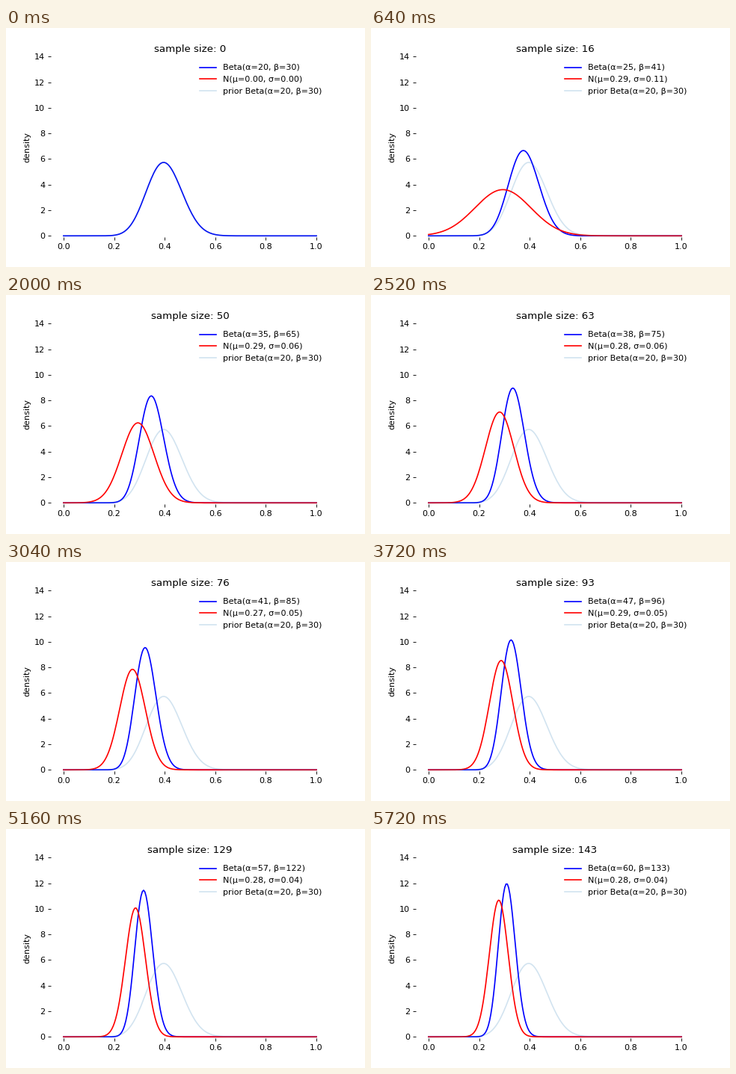
Recreate the animation shown at these times as a matplotlib script. Size 480x320 px, loop 5760 ms.

```python
from math import lgamma

import matplotlib.pyplot as plt
import numpy as np
from matplotlib.animation import FuncAnimation

FRAMES, STEP_MS = 144, 40
A0, B0 = 20, 30

plt.rcParams.update({"font.family": "DejaVu Sans", "font.size": 10})

x = np.linspace(0, 1, 200)

# Running count of successes, steady between a few known totals
trials = [0, 33, 50, 76, 109, 129, 143]
totals = [0, 11, 15, 21, 33, 37, 40]
hits = np.rint(np.interp(np.arange(FRAMES), trials, totals)).astype(int)


def beta_pdf(a, b):
    with np.errstate(divide="ignore"):
        log_pdf = (a - 1) * np.log(x) + (b - 1) * np.log1p(-x)
    return np.exp(log_pdf + lgamma(a + b) - lgamma(a) - lgamma(b))


def normal_pdf(mu, sigma):
    if sigma == 0:
        return np.full_like(x, np.nan)
    return np.exp(-((x - mu) / sigma) ** 2 / 2) / (sigma * np.sqrt(2 * np.pi))


fig, ax = plt.subplots(figsize=(6, 4), dpi=80)
fig.subplots_adjust(left=0.125, right=0.9, bottom=0.125, top=0.88)
ax.set(xlim=(-0.05, 1.05), ylim=(-0.1, 14), ylabel="density")
ax.spines[:].set_visible(False)

posterior, = ax.plot(x, beta_pdf(A0, B0), color="b", lw=1.5, label="Beta")
normal, = ax.plot(x, normal_pdf(0, 0), color="r", lw=1.5, label="N")
ax.plot(x, beta_pdf(A0, B0), color="C0", lw=1.5, alpha=0.2,
        label=f"prior Beta(α={A0}, β={B0})")
title = ax.set_title("sample size: 0", fontsize=12)
legend = ax.legend(loc="upper right", frameon=False)
beta_text, normal_text, _ = legend.get_texts()


def update(n):
    k = hits[n]
    a, b = A0 + k, B0 + n - k
    mu = k / (n + 1)
    sigma = np.sqrt(mu * (1 - mu) / (n + 1))
    posterior.set_ydata(beta_pdf(a, b))
    normal.set_ydata(normal_pdf(mu, sigma))
    title.set_text(f"sample size: {n}")
    beta_text.set_text(f"Beta(α={a}, β={b})")
    normal_text.set_text(f"N(μ={mu:.2f}, σ={sigma:.2f})")
    return posterior, normal, title, beta_text, normal_text


anim = FuncAnimation(fig, update, frames=FRAMES, interval=STEP_MS,
                     init_func=lambda: update(0), repeat=True, repeat_delay=0)
plt.show()
```
